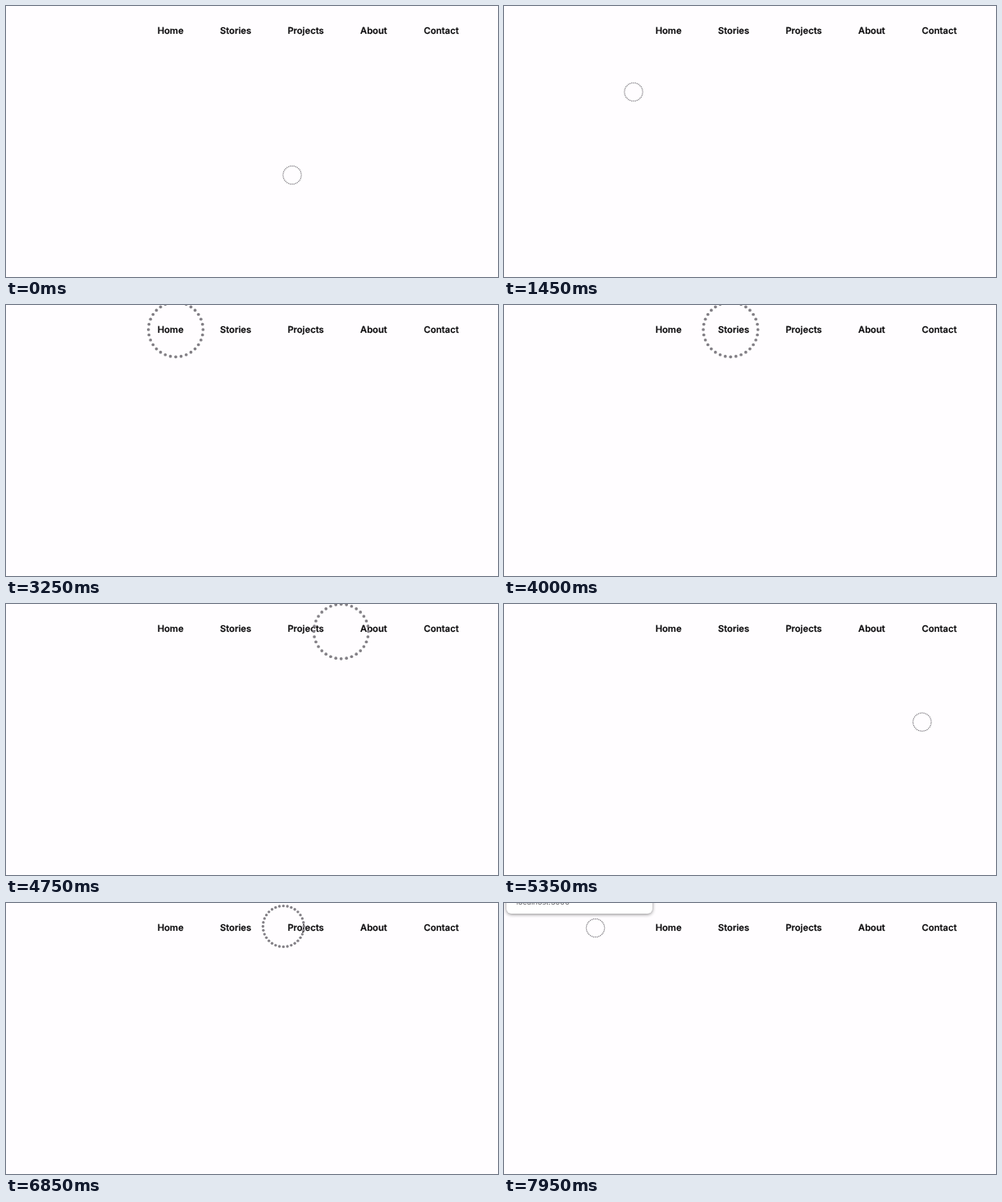
Animation of 600x331 px, one loop 8 s. Source, as an HTML page:

```html
<!DOCTYPE html>
<html lang="en">
<head>
<meta charset="utf-8">
<title>Dotted cursor</title>
<style>
  html, body { margin: 0; width: 100%; height: 100%; overflow: hidden; background: #fffdff; }
  svg { display: block; width: 100%; height: 100%; }
  text { font-family: Inter, sans-serif; text-rendering: geometricPrecision; }
  #nav { font-size: 11.2px; font-weight: 600; fill: #0d0c0e; stroke: #0d0c0e; stroke-width: 0.15px; }
  #card { filter: drop-shadow(0 1px 2px #0007); }
</style>
</head>
<body>
<svg viewBox="0 0 600 331">
  <g id="nav">
    <text x="184.7" y="34.2">Home</text>
    <text x="261" y="34.2">Stories</text>
    <text x="343.4" y="34.2">Projects</text>
    <text x="432" y="34.2">About</text>
    <text x="509.4" y="34.2">Contact</text>
  </g>
  <g id="ring" fill="#838086"></g>
  <g id="card">
    <rect x="3" y="-40" width="178" height="53" rx="6" fill="#fff"/>
    <text x="15" y="2.3" font-size="9.2" fill="#5f6166">localhost:3000</text>
  </g>
</svg>
<script>
const LOOP = 8000, STEP = 50, DOTS = 32, LEAD = 100;
const ring = document.getElementById('ring');
const card = document.getElementById('card');

const dots = Array.from({ length: DOTS }, () =>
  ring.appendChild(document.createElementNS(ring.namespaceURI, 'circle')));

// Turning points of the pointer: time, x, y
const stops = [
  [450, 349, 206.5],
  [800, 335, 30],
  [1100, 29, 62],
  [1300, 116, 122],
  [1450, 158, 105],
  [1850, 187, 30],
  [3250, 207, 30],
  [3850, 264.5, 30],
  [4500, 320, 30],
  [4750, 408.7, 33.5],
  [5250, 495, 149],
  [5550, 529, 118],
  [5950, 486, 22.5],
  [6400, 449.5, 25],
  [6850, 338.3, 28.5],
  [6950, 321, 53],
  [7250, 464, 131],
  [7450, 345, 171],
  [7900, 111.5, 30.5]
];

const clamp01 = v => Math.min(1, Math.max(0, v));
const smoothstep = (from, to, v) => {
  const u = clamp01((v - from) / (to - from));
  return u * u * (3 - 2 * u);
};
const slope = (i, c) => (stops[i + 1][c] - stops[i][c]) / (stops[i + 1][0] - stops[i][0]);

// Harmonic mean of the neighbouring slopes: smooth, without overshoot.
function tangent(i, c) {
  if (i === 0 || i === stops.length - 1) return 0;
  const a = slope(i - 1, c), b = slope(i, c);
  return a * b > 0 ? 2 * a * b / (a + b) : 0;
}

function position(time) {
  const t = Math.min(Math.max(time, stops[0][0]), stops.at(-1)[0]);
  const next = Math.max(1, stops.findIndex(stop => stop[0] >= t)), i = next - 1;
  const span = stops[next][0] - stops[i][0];
  const u = (t - stops[i][0]) / span, v = 1 - u;
  return [1, 2].map(c =>
    v * v * (1 + 2 * u) * stops[i][c] + u * u * (3 - 2 * u) * stops[next][c] +
    span * u * v * (v * tangent(i, c) - u * tangent(next, c)));
}

// The ring grows over the menu; the pointer runs a little ahead of it.
function hover(time) {
  const [x, y] = position(time + LEAD);
  return smoothstep(120, 170, x) * smoothstep(60, 48, y);
}

function draw() {
  const time = Math.floor(performance.now() % LOOP / STEP) * STEP;
  const [x, y] = position(time), grown = hover(time);
  const radius = 11.1 * (1 + 2 * grown);
  const dotRadius = 0.75 + 1.1 * Math.sin(grown * Math.PI / 2);
  dots.forEach((dot, i) => {
    const angle = i / DOTS * 2 * Math.PI;
    dot.setAttribute('cx', x + radius * Math.cos(angle));
    dot.setAttribute('cy', y + radius * Math.sin(angle));
    dot.setAttribute('r', dotRadius);
  });
  card.setAttribute('opacity', clamp01((time - 7800) / 100));
  requestAnimationFrame(draw);
}
draw();
</script>
</body>
</html>
```
